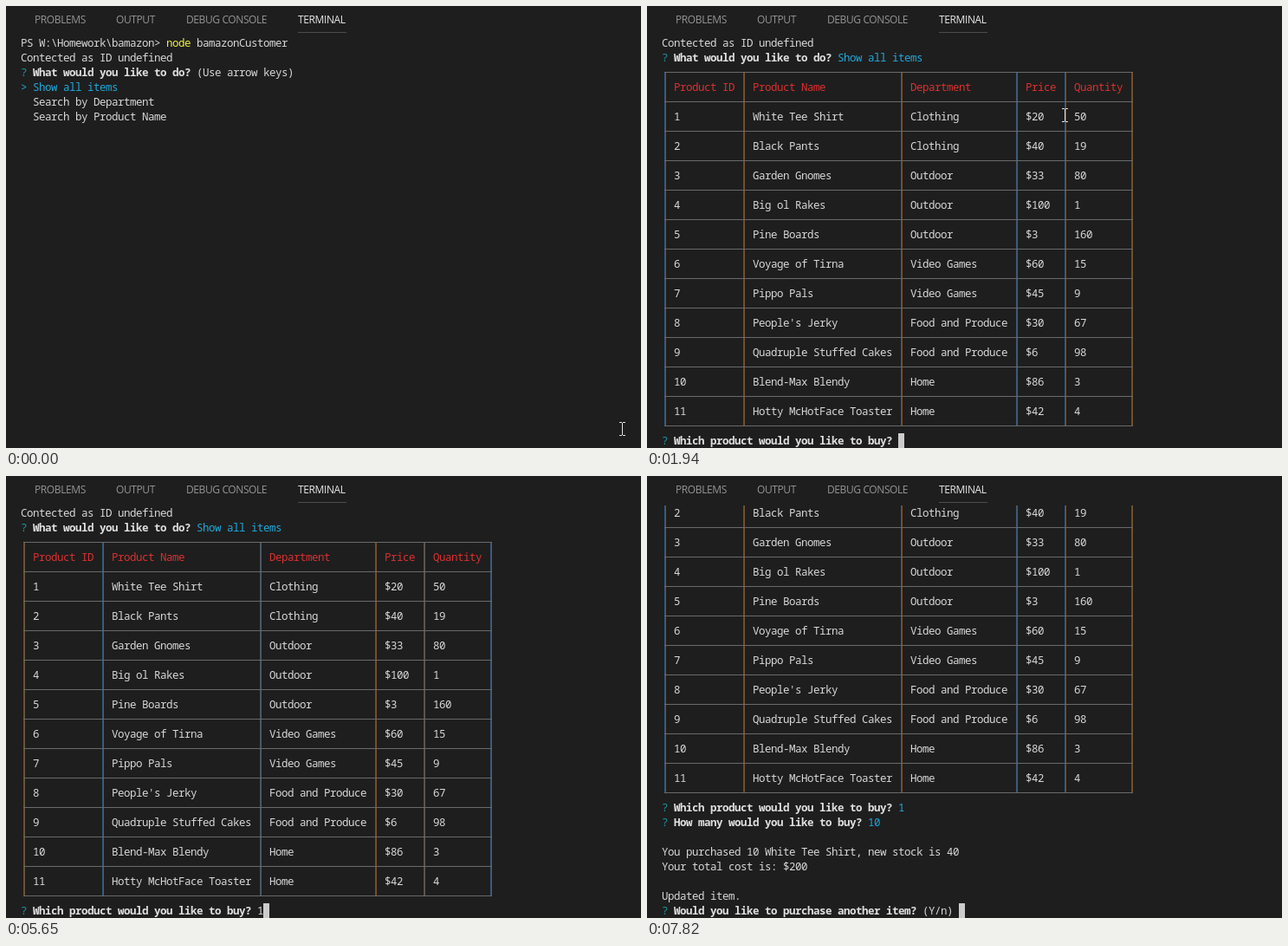
Write an HTML page that moves like this. It is 733 by 510 pixels and loops after 8 s.

```html
<!DOCTYPE html>
<html lang="en">
<head>
<meta charset="utf-8">
<title>Terminal shop</title>
<style>
  html, body { margin: 0; width: 100%; height: 100%; overflow: hidden; background: #1e1e1e; }
  svg { display: block; }
  text { white-space: pre; }
  #tabs { font: 12px "Open Sans", "Noto Sans", sans-serif; letter-spacing: -0.4px; fill: #949494; }
  #tabs .active { fill: #e7e7e7; }
  #screen { font: 500 12.5px "Noto Sans Mono", "DejaVu Sans Mono", monospace; letter-spacing: -0.5px; fill: #d8d8d8; }
  #screen .bold { font-weight: 700; fill: #e0e0e0; }
  .mark { fill: #1a97a3; }
  .cyan { fill: #20a8dc; }
  .yellow { fill: #f0f040; }
  .red { fill: #dc3030; }
  .block { fill: #cccccc; }
  .rule { fill: #6a6a6a; }
  .blue { fill: #36597a; }
  .brown { fill: #78522a; }
</style>
</head>
<body>
<svg width="733" height="510" viewBox="0 0 733 510">
  <clipPath id="pane"><rect y="34" width="733" height="476"/></clipPath>
  <rect width="733" height="510" fill="#1e1e1e"/>
  <g id="tabs">
    <text x="33" y="20">PROBLEMS</text>
    <text x="127" y="20">OUTPUT</text>
    <text x="208" y="20">DEBUG CONSOLE</text>
    <text x="337" y="20" class="active">TERMINAL</text>
    <rect x="337" y="30" width="56" height="1" fill="#4c4c4c"/>
  </g>
  <g id="screen" clip-path="url(#pane)"></g>
  <path id="mouse" d="M0 .5H3M4 .5H7M3.5 1V15M0 15.5H3M4 15.5H7" stroke="#e4e4e4" fill="none"/>
</svg>
<script>
const LOOP = 8000, LEFT = 17, TOP = 34, CELL = 7, LINE = 17;
const screenEl = document.getElementById('screen');
const mouse = document.getElementById('mouse');

const products = [
  ['Product ID', 'Product Name', 'Department', 'Price', 'Quantity'],
  [1, 'White Tee Shirt', 'Clothing', '$20', 50],
  [2, 'Black Pants', 'Clothing', '$40', 19],
  [3, 'Garden Gnomes', 'Outdoor', '$33', 80],
  [4, 'Big ol Rakes', 'Outdoor', '$100', 1],
  [5, 'Pine Boards', 'Outdoor', '$3', 160],
  [6, 'Voyage of Tirna', 'Video Games', '$60', 15],
  [7, 'Pippo Pals', 'Video Games', '$45', 9],
  [8, "People's Jerky", 'Food and Produce', '$30', 67],
  [9, 'Quadruple Stuffed Cakes', 'Food and Produce', '$6', 98],
  [10, 'Blend-Max Blendy', 'Home', '$86', 3],
  [11, 'Hotty McHotFace Toaster', 'Home', '$42', 4]
];
const borders = [0, 13, 39, 58, 66, 77];

const colX = col => LEFT + col * CELL;
const rowY = row => TOP + row * LINE;
const escapeText = s => String(s).replace(/&/g, '&amp;').replace(/</g, '&lt;').replace(/>/g, '&gt;');

const rect = (x, y, w, h, style) =>
  `<rect class="${style}" x="${x}" y="${y}" width="${w}" height="${h}"/>`;

const put = (row, col, str, style = '') =>
  `<text class="${style}" x="${colX(col)}" y="${rowY(row) + 13}">${escapeText(str)}</text>`;

const block = (row, col) => rect(colX(col), rowY(row), CELL, LINE, 'block');

function ask(row, question, answer = '', style = 'cyan') {
  return put(row, 0, '?', 'mark') + put(row, 2, question, 'bold') +
    put(row, question.length + 3, answer, style);
}

// A prompt still being answered, with the block cursor after the typed text
function typing(row, question, typed) {
  return ask(row, question, typed, '') + block(row, question.length + 3 + typed.length);
}

function table(row) {
  const x = colX(0) + 3, y = rowY(row) + 8;
  const width = borders[5] * CELL + 2, height = products.length * 2 * LINE;
  let out = '';
  // Subpixel text rendering splits each upright into a blue and a brown edge
  for (const col of borders) {
    out += rect(x + col * CELL, y, 1, height, 'blue') + rect(x + col * CELL + 1, y, 1, height, 'brown');
  }
  for (let i = 0; i <= products.length; i++) out += rect(x, y + i * 2 * LINE, width, 1, 'rule');
  products.forEach((item, i) => item.forEach((value, c) => {
    out += put(row + 1 + i * 2, borders[c] + 2, value, i ? '' : 'red');
  }));
  return out;
}

function menu() {
  return put(0, 0, 'PS W:\\Homework\\bamazon>') + put(0, 24, 'node', 'yellow') +
    put(0, 29, 'bamazonCustomer') +
    put(1, 0, 'Contected as ID undefined') +
    ask(2, 'What would you like to do?', '(Use arrow keys)', '') +
    put(3, 0, '>', 'cyan') + put(3, 2, 'Show all items', 'cyan') +
    put(4, 2, 'Search by Department') + put(5, 2, 'Search by Product Name');
}

function shop(scroll, product, amount) {
  const which = 'Which product would you like to buy?';
  const many = 'How many would you like to buy?';
  let out = table(2 - scroll);
  if (scroll < 1) out += put(0, 0, 'Contected as ID undefined');
  if (scroll < 2) out += ask(1 - scroll, 'What would you like to do?', 'Show all items');
  if (scroll === 0) return out + typing(27, which, product);
  out += ask(27 - scroll, which, product);
  if (scroll === 1) return out + typing(27, many, amount);
  return out + ask(21, many, amount) +
    put(23, 0, 'You purchased 10 White Tee Shirt, new stock is 40') +
    put(24, 0, 'Your total cost is: $200') +
    put(26, 0, 'Updated item.') +
    typing(27, 'Would you like to purchase another item?', '(Y/n) ');
}

const scenes = [
  [0, menu],
  [930, () => shop(0, '', '')],
  [5650, () => shop(0, '1', '')],
  [5880, () => shop(1, '1', '')],
  [7440, () => shop(1, '1', '1')],
  [7520, () => shop(1, '1', '10')],
  [7820, () => shop(7, '1', '10')]
];

const mix = (a, b, p) => Math.round(a + (b - a) * p);

// Top left corner of the pointer, or null while it is away
function pointer(t) {
  if (t < 70) return [708, 480];
  if (t >= 3400 && t < 3480) return [727, 336];
  if (t < 1630 || t >= 3170) return null;
  const step = Math.floor((t - 1625) / 77);
  if (step <= 4) {
    const p = 1 - (1 - step / 4) ** 2;
    return [mix(715, 479, p), mix(178, 118, p)];
  }
  if (step <= 10) {
    const p = (step - 4) / 6;
    return [mix(479, 493, p), mix(118, 115, p)];
  }
  const p = Math.min(1, (step - 10) / 9) ** 1.5;
  return [mix(493, 658, p), mix(115, 128, p)];
}

let shown = -1;
function draw(t) {
  const index = scenes.filter(scene => t >= scene[0]).length - 1;
  if (index !== shown) {
    screenEl.innerHTML = scenes[index][1]();
    shown = index;
  }
  const at = pointer(t);
  mouse.setAttribute('visibility', at ? 'visible' : 'hidden');
  if (at) mouse.setAttribute('transform', `translate(${at})`);
}

const start = performance.now();
function tick() {
  draw((performance.now() - start) % LOOP);
  requestAnimationFrame(tick);
}
tick();
</script>
</body>
</html>
```
